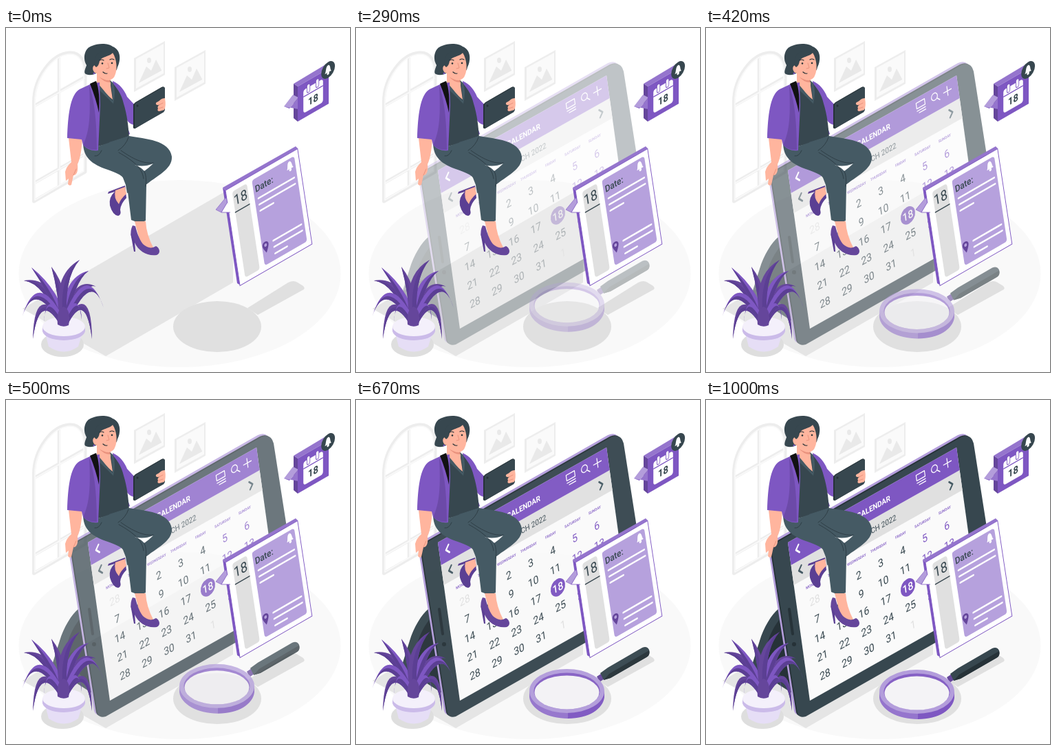
Animation of 500x500 px, one loop 1040 ms. Source, as an HTML page:

```html
<!DOCTYPE html>
<html lang="en">
<head>
<meta charset="utf-8">
<title>Calendar illustration</title>
<style>
html, body { margin: 0; width: 100%; height: 100%; overflow: hidden; background: #fff; }
svg { display: block; width: 100%; height: 100%; }
text { font-family: Roboto, "Open Sans", sans-serif; text-anchor: middle; }
.line { fill: none; stroke-linecap: round; stroke-linejoin: round; }
.skin { fill: #ffb59e; }
</style>
</head>
<body>
<svg viewBox="0 0 500 500">
  <defs>
    <g id="bell"><path d="M-5.500 4C-3 2-4.500-6 0-6.500C4.500-6 3 2 5.500 4Z"/><circle cy="5.500" r="2"/></g>
    <path id="slab" d="M96 222Q94 212 103 207L371 54Q385 48 389 63L426 300L145 460Q136 463 133 455Z"/>
    <g id="picture">
      <path d="M0 25L45 0V49L0 74Z" fill="#ededed"/>
      <path d="M3 26L43 4V47L3 69Z" fill="#fafafa"/>
      <path d="M7 61L18 37L25 43L32 27L40 42V43Z" fill="#e9e9e9"/>
      <ellipse cx="22" cy="28" rx="3" ry="4" fill="#e9e9e9"/>
    </g>
  </defs>

  <ellipse cx="252.500" cy="357" rx="234" ry="136" fill="#f9f9f9"/>
  <path d="M24 408L330 231V370L145 477Z" fill="#e5e5e5"/>

  <!-- window and pictures -->
  <g class="line" stroke="#ededed" stroke-width="5">
    <path d="M40.500 252V107C41 72 66 38 92 36C108 35 115 48 115 68V209Z"/>
    <path d="M77 44V230M43 112L115 71M43 224L115 183" stroke-width="4.500"/>
    <path d="M42 250V107C42 74 67 40 92 38C106 37 113 48 113 68V208ZM78 44V229M43 113L114 73M43 225L114 184" stroke="#fafafa" stroke-width="1.600"/>
  </g>
  <use href="#picture" x="186" y="19"/>
  <use href="#picture" x="245" y="32"/>

  <!-- calendar tablet -->
  <g id="tablet">
    <path d="M106 303C95 312 84 330 78 350L66 388L128 428Z" fill="#37474f"/>
    <path d="M108 318C97 330 88 350 84 376L125 416Z" fill="#263238"/>
    <use href="#slab" x="-5" y="-3" fill="#b39ddb"/>
    <use href="#slab" x="-2" y="-1" fill="#263238"/>
    <use href="#slab" fill="#37474f"/>
    <path class="line" d="M121 304L126 340" stroke="#263238" stroke-width="4"/>
    <circle cx="128" cy="355" r="3" fill="#263238"/>
    <g id="screen" transform="matrix(.866 -.488 .139 1 119 207)">
      <path d="M0 0H283V230H0Z" fill="#fafafa"/>
      <path d="M0 33H283V62H0Z" fill="#e0e0e0"/>
      <path d="M0 0H283V33H0Z" fill="#7e57c2"/>
      <g class="line" stroke="#fff" stroke-width="1.300">
        <path d="M16 11L11 16.500L16 22" stroke-width="2.500"/>
        <path d="M214 7H228V15H214ZM214 18.500H228M217 22H228"/>
        <circle cx="244" cy="12" r="5"/>
        <path d="M248 16L252 20M259 14H272M265.500 7.500V20.500"/>
        <path d="M16 41L11 46.500L16 52M264 41L269 46.500L264 52" stroke="#455a64" stroke-width="2.500"/>
      </g>
    </g>
  </g>

  <!-- woman -->
  <path class="skin" d="M91 160L111 161C110 176 108 190 104 198C105 208 103 214 98 214L95 228Q92 230 90 227L91 219L87 222L86 209Q88 201 95 195Z"/>
  <path class="line" d="M98 214L102 205" stroke="#e9937e"/>
  <path d="M155 77C166 82 172 90 176 100L189 114L190 141C180 142 176 134 171 128L178 156L163 160Z" fill="#7e57c2"/>
  <path d="M171 128L180 154L174 158L163 110Z" fill="#6c4aa8"/>
  <path d="M133 82L151 76C161 86 168 96 171 110C176 126 178 143 179 160L134 172L128 120Z" fill="#37474f"/>
  <path class="skin" d="M132 64L152 73L152 84L155 104C145 96 138 88 132 82Z"/>
  <path d="M134 69Q142 77 152 76V79Q141 79 134 69Z" fill="#e9937e"/>
  <path d="M132 79C142 90 148 98 155 106C155 95 154 87 151 76L156 80Q160 92 156 110C147 101 138 92 130 86Z" fill="#455a64"/>

  <g fill="#455a64">
    <path d="M150 166L179 157C202 161 238 163 241 187C242 206 218 215 201 230L191 234L176 240L174 228Z"/>
    <path d="M112 166L134 172L178 157C178 174 171 176 167 180L186 194C199 202 204 211 204 228L203 280Q194 285 182 279L176 230C173 214 163 212 148 206C124 198 112 188 112 166Z"/>
  </g>
  <path d="M187 199Q200 203 214 197Q208 203 201 208Q196 202 187 199Z" fill="#fff"/>
  <g class="line" stroke="#2f3e46">
    <path d="M167 178C184 190 200 198 214 196M178 159Q174 171 163 178M139 178Q135 187 129 186M164 181C185 193 198 203 200 219M201 208Q205 216 203 230"/>
  </g>
  <path d="M122 82L136 79L137 112L134 178Q121 180 112 170L110 162L89 160C90 128 93 97 107 89Z" fill="#7e57c2"/>
  <path d="M121 84C127 101 132 128 132 177Q120 178 112 170C122 150 123 124 121 84Z" fill="#6c4aa8"/>
  <path d="M122 81L131 77Q137 93 135 123Q131 103 122 81Z" fill="#111"/>
  <path d="M116 67C112 65 116 58 117 54C111 44 114 29 125 26C134 22 149 22 155 27C166 31 168 45 162 57Q161 63 157 63L131 66Q123 70 116 67Z" fill="#37474f"/>
  <path class="skin" d="M131 54C133 40 148 43 155 36C161 45 162 59 159 67Q156 77 147 75C138 73 133 71 132 66C125 65 124 53 131 54Z"/>
  <path d="M129 55C126 37 139 29 155 36C150 42 139 41 136 48Q135 55 131 57Z" fill="#37474f"/>
  <path class="line" d="M136 47Q139 45 142 47M151 46Q154 44 157 46M141 64Q144 67 147 66" stroke="#263238" stroke-width="1.200"/>
  <path class="line" d="M148 51L150 58L146 59" stroke="#e9937e"/>
  <circle cx="140" cy="51.500" r="1.300" fill="#263238"/>
  <circle cx="154" cy="51" r="1.300" fill="#263238"/>
  <circle cx="128" cy="66" r="1.300" fill="#7e57c2"/>
  <path d="M185 111L188 108L226 86Q230 84 231 88V117Q231 121 227 123L188 146Q184 147 185 142Z" fill="#263238"/>
  <path d="M187 113Q187 109 190 108L228 86Q231 85 231 89V117Q231 121 228 123L187 146Z" fill="#37474f"/>
  <circle cx="191" cy="113" r="1.500" fill="#263238"/>
  <path class="skin" d="M231 102C226 102 224 105 221 107Q217 108 218 111Q220 113 224 111Q219 114 221 117Q219 121 223 121L230 119Q233 114 231 102Z"/>
  <path class="line" d="M222 112L228 109M222 117L228 115" stroke="#e9937e"/>

  <path d="M173 229L149 238L148 241L158 238Q149 246 151 258Q155 272 163 273Q168 272 166 264Q167 255 175 247Z" fill="#5b3f93"/>
  <path class="skin" d="M159 236L173 231L175 241Q166 249 164 256Q156 247 159 236Z"/>
  <path class="skin" d="M187 281L203 281Q204 300 214 319Q205 326 196 315Z"/>
  <path d="M184 287C179 297 182 307 187 312C193 325 206 332 219 330C225 328 224 320 218 317Q209 323 199 314C193 306 190 296 188 288Z" fill="#65469b"/>
  <path d="M181 298L186 325H188L187 310Z" fill="#5b3f93"/>

  <!-- plant -->
  <ellipse cx="82" cy="460" rx="31" ry="18" fill="#dedede"/>
  <path d="M56 440L62 463Q84 478 105 463L112 440Z" fill="#e6def6"/>
  <path d="M53 433V441Q57 453 84 454Q111 453 115 441V433Z" fill="#cbbbe9"/>
  <ellipse cx="84" cy="434" rx="31" ry="14" fill="#f4f0fb"/>
  <g id="leaves"></g>

  <!-- magnifier -->
  <g fill="#e0e0e0">
    <ellipse cx="307" cy="434" rx="64" ry="37"/>
    <path d="M351 407L410 370Q418 366 424 370L432 375Q436 379 431 381L366 417Z"/>
  </g>
  <g id="lens">
    <path d="M350 403L359 397L364 404L354 411Z" fill="#65469b"/>
    <path d="M355 398L366 390L416 361Q423 358 426 364Q428 372 422 375L370 405L360 408Z" fill="#37474f"/>
    <path d="M360 408L370 405L422 375Q428 372 426 365L368 399Z" fill="#263238"/>
    <path d="M252 424V433C254 450 278 464 308 464V424Z" fill="#9575cd"/>
    <path d="M361 424V433C359 450 338 464 308 464V424Z" fill="#7e57c2"/>
    <ellipse cx="306.500" cy="424" rx="54.500" ry="32" fill="#b39ddb"/>
    <ellipse cx="306.500" cy="424" rx="48" ry="26.500" fill="#8661c5"/>
    <ellipse cx="306.500" cy="426" rx="47" ry="24.500" fill="#f4f3f6"/>
  </g>

  <!-- event card -->
  <path d="M315 232L421 172L424 175L319 236Z" fill="#9575cd"/>
  <path d="M315 232L319 236L341 374L336 371Z" fill="#7e57c2"/>
  <path d="M305 264L319 247L326 252L313 268Z" fill="#b39ddb" stroke="#7e57c2" stroke-width=".6"/>
  <g id="card" transform="matrix(.866 -.5 .152 1 319 236)">
    <path d="M0 0H121V138.500H0Z" fill="#fff" stroke="#7e57c2"/>
    <rect x="10" y="7" width="24.500" height="125" rx="4" fill="#e0e0e0"/>
    <rect x="43" y="7" width="71" height="124" rx="4" fill="#b6a1dd"/>
    <path class="line" d="M10 37H34" stroke="#37474f" stroke-width="1.300"/>
    <path class="line" d="M49 36H109M49 45H109M49 54H71M62 104H109M62 113H109M62 122.500H82" stroke="#fff" stroke-width="2.600"/>
    <path d="M49 115Q44 107 44 104A5 5 0 0 1 54 104Q54 107 49 115Z" fill="#65469b"/>
    <circle cx="49" cy="104" r="2.200" fill="#b6a1dd"/>
    <use href="#bell" x="105" y="17" fill="#fff"/>
  </g>
  <path d="M322 253L313 268L326 268" fill="#fff" stroke="#7e57c2" stroke-width=".8"/>

  <!-- reminder icon -->
  <path d="M418 81L463 54L469 59L424 85Z" fill="#9575cd"/>
  <path d="M418 81L424 85V136L418 131Z" fill="#65469b"/>
  <path d="M404 114L417 97L425 101L412 117Z" fill="#b39ddb"/>
  <path d="M404 114L412 117L425 101V118Z" fill="#9575cd"/>
  <g id="icon" transform="matrix(.866 -.5 0 1 424 85)">
    <path d="M0 0H52V51H0Z" fill="#7e57c2"/>
    <rect x="9.500" y="10" width="33" height="34" rx="4" fill="#fff"/>
    <path d="M9.500 20H42.500" stroke="#7e57c2" stroke-width="1.500"/>
    <path class="line" d="M18 8V15M33 8V15" stroke="#7e57c2" stroke-width="6"/>
    <path class="line" d="M18 8V15M33 8V15" stroke="#fff" stroke-width="4"/>
    <circle cx="51" cy="1.500" r="11.500" fill="#37474f"/>
    <use href="#bell" x="51" y="1" fill="#fff"/>
  </g>
</svg>
<script>
const el = id => document.getElementById(id);
const add = (id, markup) => el(id).insertAdjacentHTML('beforeend', markup);
const DARK = '#37474f', PURPLE = '#7e57c2', DEEP = '#65469b', SHADE = '#5b3f93', PALE = '#e0e0e0';

function label(id, words, x, y, size, fill, weight = 400) {
  add(id, `<text x="${x}" y="${y + size * .36}" font-size="${size}" font-weight="${weight}" fill="${fill}">${words}</text>`);
}

// Calendar page
const column = i => 29.3 + 36.95 * i;
label('screen', 'CALENDAR', 141, 17.5, 11, '#fff', 700);
label('screen', 'MARCH 2022', 141, 48, 11, DARK);
['MON', 'TUES', 'WEDNES', 'THURS', 'FRI', 'SATUR', 'SUN'].forEach((day, i) =>
  label('screen', day + 'DAY', column(i), 75.5, 5.4, PURPLE, 500));
add('screen', `<circle cx="${column(4)}" cy="151.8" r="12" fill="${PURPLE}"/>`);
for (let i = 0; i < 33; i++) {
  const col = i % 7, outside = i < 1 || i > 31;
  const fill = outside ? PALE : i === 18 ? '#fff' : col > 4 ? PURPLE : DARK;
  label('screen', i < 1 ? 28 : i > 31 ? i - 31 : i, column(col), 98 + 26.9 * Math.floor(i / 7), 15.5, fill, i === 18 ? 500 : 400);
}

label('card', '18', 21.6, 20.5, 20, DARK);
label('card', 'Date:', 61, 21.4, 13, DARK, 500);
label('icon', '18', 26, 31.5, 15, DARK, 700);

// Leaves: control point, tip, width
const BASE = { x: 84, y: 432 };
const leaves = [
  [62, 365, 26, 367, 9], [104, 362, 131, 376, 9], [72, 385, 37, 348, 8], [90, 365, 120, 353, 9],
  [84, 382, 66, 347, 8], [74, 362, 107, 337, 9], [45, 355, 24, 418, 10], [120, 340, 142, 407, 10],
  [45, 372, 39, 452, 10], [120, 370, 125, 452, 10], [58, 380, 55, 428, 8], [106, 380, 110, 424, 8]
];
add('leaves', leaves.map(([cx, cy, x, y, w], i) => {
  const dx = x - BASE.x, dy = y - BASE.y, len = Math.hypot(dx, dy);
  const edge = k => `${cx - dy / len * w * k} ${cy + dx / len * w * k}`;
  const blade = (from, to, fill) =>
    `<path d="M${BASE.x + 5 * from} ${BASE.y}Q${edge(from)} ${x} ${y}Q${edge(to)} ${BASE.x + 5 * to} ${BASE.y}Z" fill="${fill}"/>`;
  const under = dx < 0 ? -1 : 1;
  return blade(-1, 1, i % 4 < 2 ? DEEP : PURPLE) + blade(0, under, SHADE);
}).join(''));
add('leaves', `<path d="M75 431Q73 408 84 405Q95 410 91 432Q83 436 75 431Z" fill="${DEEP}"/>`);

// Fade and drop, with a slight overshoot
const LOOP = 1040, STEP = LOOP / 25, DROP = 36;
const start = performance.now();
function draw() {
  const time = (performance.now() - start) % LOOP;
  const s = Math.floor(time / STEP) * STEP / 1000;
  const p = s * (1.3 + s * (1.3 - 1.6 * s));
  const opacity = Math.min(1, p ** 1.2);
  el('tablet').setAttribute('opacity', opacity);
  el('lens').setAttribute('opacity', opacity);
  el('lens').setAttribute('transform', `translate(0 ${DROP * (p - 1)})`);
  requestAnimationFrame(draw);
}
draw();
</script>
</body>
</html>
```
